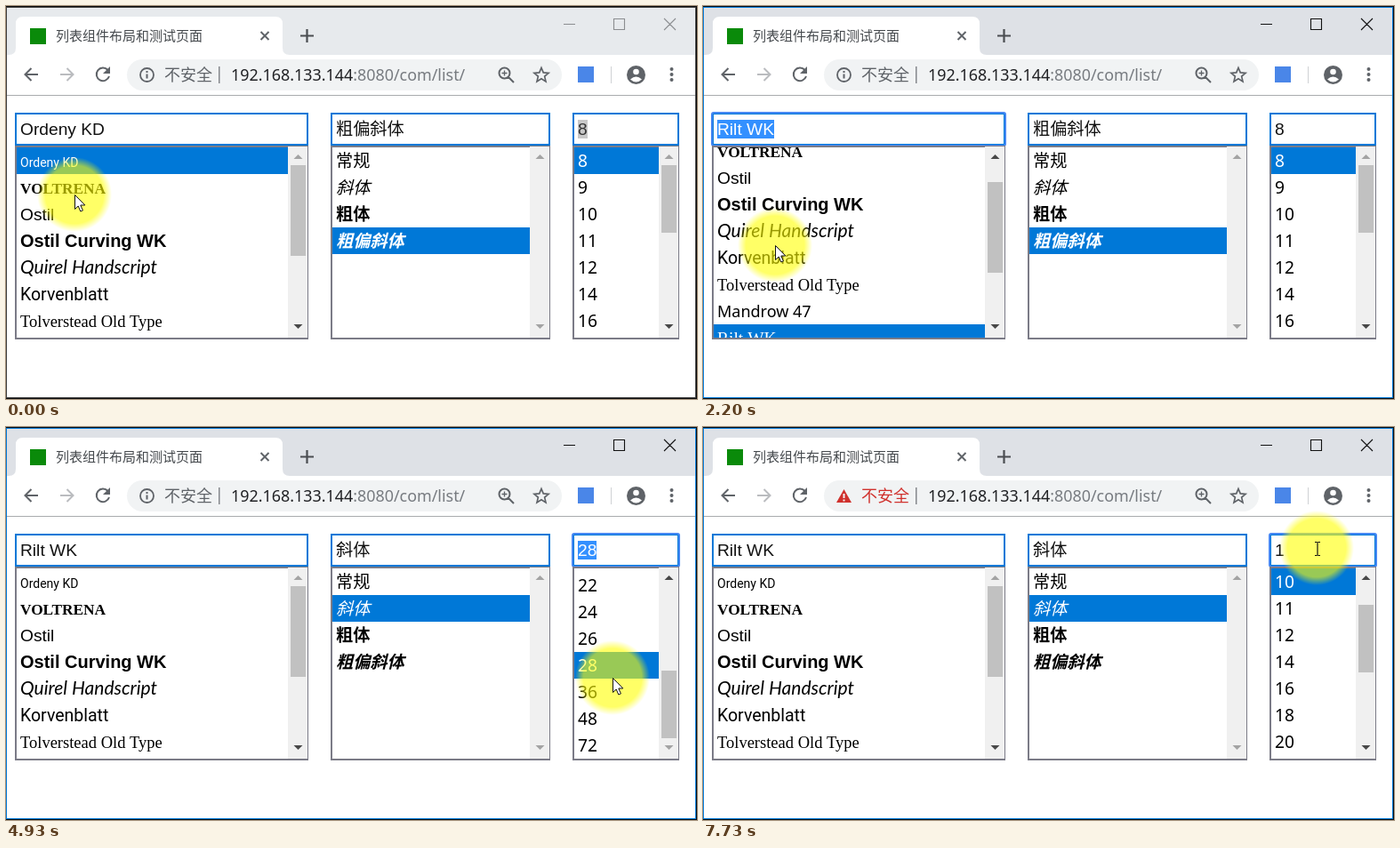
These frames come from a looping animation (777 by 442 pixels, 8 s). An HTML page with a canvas:

```html
<!DOCTYPE html>
<html lang="zh-CN">
<head>
<meta charset="utf-8">
<style>
html, body { margin: 0; width: 100%; height: 100%; overflow: hidden; background: #fff; }
canvas { display: block; }
</style>
</head>
<body>
<canvas id="stage" width="777" height="442"></canvas>
<script>
const ctx = document.getElementById('stage').getContext('2d', { alpha: false });
const LOOP = 8000;
const BLUE = '#0078d7', ICON = '#5f6368';
const UI = '"Noto Sans", "Noto Sans CJK SC", sans-serif';
const SANS = '"Liberation Sans", "Noto Sans CJK SC", sans-serif';
const SERIF = '"Liberation Serif", serif';
const FIELD = '19.2px ' + SANS;

// Moments of the clicks and key presses
const PICK_FONT = 1530, PICK_STYLE = 3330, PICK_SIZE = 4700, CLICK_FIELD = 5700;
const ERASE_ONE = 6470, ERASE_ALL = 6670, TYPE_ONE = 6740;

const fonts = [
  ['Ordeny KD', '14px Roboto, sans-serif'],
  ['VOLTRENA', 'bold 17.3px ' + SERIF],
  ['Ostil', FIELD],
  ['Ostil Curving WK', 'bold 20px ' + SANS],
  ['Quirel Handscript', 'italic 21px Lato, sans-serif'],
  ['Korvenblatt', '19.5px Roboto, sans-serif'],
  ['Tolverstead Old Type', '18.5px ' + SERIF],
  ['Mandrow 47', '18px ' + UI],
  ['Rilt WK', '19.5px ' + SERIF],
  ['Torvin Sans KD', 'bold 16.7px Lato, sans-serif'],
  ['Lestrin WK', 'bold 16.5px ' + SERIF],
  ['DuskVipers QRC', 'italic 17.8px ' + SERIF]
];
const styles = [['常规', ''], ['斜体', 'italic '], ['粗体', 'bold '], ['粗偏斜体', 'italic bold ']]
  .map(([name, style]) => [name, style + '19.2px "Noto Sans CJK SC", sans-serif']);
const sizes = [8, 9, 10, 11, 12, 14, 16, 18, 20, 22, 24, 26, 28, 36, 48, 72]
  .map(n => [String(n), '19.2px ' + UI]);

const pointerPath = [
  [0, 77, 212], [1000, 77, 212], [1400, 78, 271], [1800, 81, 269], [2600, 81, 269],
  [2930, 460, 264], [3330, 428, 206], [3600, 428, 206], [3930, 670, 231], [4400, 679, 261],
  [4530, 679, 261], [4930, 682, 282], [4990, 682, 284], [5600, 690, 136], [LOOP, 690, 136]
];

const progress = (t, a, b) => Math.min(1, Math.max(0, (t - a) / (b - a)));
const smooth = (t, a, b) => { const p = progress(t, a, b); return p * p * (3 - 2 * p); };

function pointerAt(t) {
  const i = pointerPath.findIndex(k => k[0] > t);
  const [a, x0, y0] = pointerPath[i - 1], [b, x1, y1] = pointerPath[i];
  const p = smooth(t, a, b);
  return [x0 + (x1 - x0) * p, y0 + (y1 - y0) * p];
}

function box(x, y, w, h, color) {
  ctx.fillStyle = color;
  ctx.fillRect(x, y, w, h);
}
function text(str, x, y, font, color) {
  ctx.font = font;
  ctx.fillStyle = color;
  ctx.fillText(str, x, y);
  return ctx.measureText(str).width;
}
function fill(d, color) {
  ctx.fillStyle = color;
  ctx.fill(new Path2D(d));
}
function stroke(d, color, width = 2) {
  ctx.strokeStyle = color;
  ctx.lineWidth = width;
  ctx.stroke(new Path2D(d));
}
const circle = (x, y, r) => `M${x - r} ${y}a${r} ${r} 0 1 1 ${2 * r} 0a${r} ${r} 0 1 1 ${-2 * r} 0z`;

function star(x, y, r) {
  let d = '';
  for (let i = 0; i < 10; i++) {
    const a = (i * 36 - 90) * Math.PI / 180, q = i % 2 ? r * 0.45 : r;
    d += (i ? 'L' : 'M') + (x + q * Math.cos(a)) + ' ' + (y + q * Math.sin(a));
  }
  return d + 'z';
}

function drawBrowser(active, warned) {
  box(0, 0, 777, 442, '#fff');
  box(0, 0, 777, 55, active ? '#dee1e6' : '#e7eaed');
  fill('M3 55Q11 55 11 47V20Q11 12 19 12H303Q311 12 311 20V47Q311 55 319 55z', '#fff');
  box(27, 25, 18, 18, '#0a8a0a');
  text('列表组件布局和测试页面', 56, 39, '15px ' + UI, '#45494d');
  stroke('M286.5 29l9 9m0-9l-9 9', ICON);
  stroke('M331 33.5h15m-7.5-7.5v15', '#4a4d51', 2.2);

  const buttons = active ? '#111' : '#8b8d90';
  stroke('M627 20.5h13M683.5 14.5h12v12h-12zM740 14l13 13m0-13l-13 13', buttons, 1.1);

  stroke('M36 77H21.5m7-7l-7 7l7 7', ICON);
  stroke('M61 77h14.5m-7-7l7 7l-7 7', '#babcbf');
  stroke('M114.5 72A7.3 7.3 0 1 0 116 79', ICON);
  fill('M117 68v8h-8z', ICON);

  ctx.beginPath();
  ctx.roundRect(136, 60, 489, 35, 17.5);
  ctx.fillStyle = '#f1f3f4';
  ctx.fill();
  if (warned) {
    fill('M158.5 70l8.5 15h-17z', '#d0312d');
    box(157.5, 75, 2, 5, '#f1f3f4');
    box(157.5, 81.5, 2, 2, '#f1f3f4');
  } else {
    stroke(circle(158.5, 77.5, 7.5), ICON, 1.8);
    box(157.5, 76.5, 2, 5, ICON);
    box(157.5, 73, 2, 2, ICON);
  }
  text('不安全', 178, 84, '18px ' + UI, warned ? '#d0312d' : ICON);
  box(239, 68, 1.5, 19, '#85888c');
  const host = text('192.168.133.144', 253, 84, '17.9px ' + UI, '#202124');
  text(':8080/com/list/', 253 + host, 84, '17.9px ' + UI, '#777b80');

  stroke(circle(560.5, 75.5, 6) + 'M565 80l6 6', ICON);
  stroke('M557.5 75.5h6m-3-3v6', ICON, 1.3);
  stroke(star(602, 78, 8.5), ICON, 1.7);
  box(643, 68, 18, 18, '#4a86e8');
  box(680, 68, 1, 19, '#d0d2d5');
  fill(circle(708.5, 77.5, 10.5), ICON);
  fill(circle(708.5, 74, 3.3) + 'M702 82.5q6.5-6 13 0q-6.5 6-13 0z', '#fff');
  for (const y of [71, 77, 83]) fill(circle(748.5, y, 2), ICON);
  box(0, 100, 777, 1, '#a9abae');

  ctx.lineWidth = 1;
  ctx.strokeStyle = '#111';
  ctx.strokeRect(-0.5, 0.5, 777, 441);
  ctx.strokeStyle = active ? BLUE : '#3c3c3c';
  ctx.strokeRect(0.5, 1.5, 775, 439);
}

// state: '' idle, 'focus', 'select', 'dim' (selected in an inactive window), 'caret'
function drawField(x, w, value, state) {
  ctx.strokeStyle = BLUE;
  ctx.lineWidth = 2;
  ctx.strokeRect(x + 1, 121, w - 2, 35);
  if (state && state !== 'dim') {
    ctx.strokeStyle = '#4587f3';
    ctx.beginPath();
    ctx.roundRect(x, 120, w, 37, 2);
    ctx.stroke();
  }
  ctx.font = FIELD;
  const width = Math.round(ctx.measureText(value).width), left = x + 6;
  if (state === 'select') box(left, 128, width, 21, '#3390ff');
  if (state === 'dim') box(left, 128, width, 21, '#c8c8c8');
  text(value, left, 145, FIELD, state === 'select' ? '#fff' : state === 'dim' ? '#323232' : '#111');
  if (state === 'caret') box(left + width - 2, 128, 1, 21, '#000');
}

function drawList(x, w, rows, selected, scroll) {
  const bar = x + w - 23, content = rows.length * 30, limit = Math.max(0, content - 214);
  const top = Math.round(scroll);
  ctx.strokeStyle = '#7b7b87';
  ctx.lineWidth = 2;
  ctx.strokeRect(x + 1, 158, w - 2, 216);
  ctx.save();
  ctx.beginPath();
  ctx.rect(x + 2, 159, w - 4, 214);
  ctx.clip();
  rows.forEach(([label, font], i) => {
    const y = 159 + i * 30 - top;
    if (y < 129 || y > 373) return;
    if (i === selected) box(x + 2, y, bar - x - 2, 30, BLUE);
    text(label, x + 6, y + 22, font, i === selected ? '#fff' : '#000');
  });
  ctx.restore();

  // The scrollbar overlaps the inner edge of the border
  box(bar, 158, 22, 215, '#f0f0f0');
  if (limit) box(bar + 3, Math.round(179 + top * 171 / content), 17, Math.round(171 * 214 / content), '#c1c1c1');
  const arrow = on => on ? '#484848' : '#a3a3a3';
  fill(`M${bar + 6.5} 172l5-5l5 5z`, arrow(top > 0));
  fill(`M${bar + 6.5} 358l5 5l5-5z`, arrow(top < limit));
}

function drawPointer(x, y, beam) {
  const glow = ctx.createRadialGradient(x, y, 0, x, y, 42);
  glow.addColorStop(0, 'rgba(255,255,0,.6)');
  glow.addColorStop(0.78, 'rgba(255,255,0,.6)');
  glow.addColorStop(1, 'rgba(255,255,0,0)');
  box(x - 42, y - 42, 84, 84, glow);
  ctx.save();
  ctx.translate(Math.round(x), Math.round(y));
  if (beam) {
    stroke('M-2 -6.5h2.5m1 0h2.5M1 -6.5v15M-2 8.5h2.5m1 0h2.5', '#111', 1.2);
  } else {
    const shape = 'M.5 .5v16l3.7-3.5l2.6 6l2.6-1.1l-2.6-5.9h5z';
    fill(shape, '#fff');
    stroke(shape, '#111', 1);
  }
  ctx.restore();
}

function sizeScroll(t) {
  if (t < ERASE_ONE) return 266 * smooth(t, 3980, 4400);
  return 266 - 206 * (1 - (1 - progress(t, TYPE_ONE - 40, 7530)) ** 4);
}

function draw(t) {
  const active = t >= PICK_FONT;
  const [x, y] = pointerAt(t);
  drawBrowser(active, t >= ERASE_ONE);

  const fontState = active && t < PICK_STYLE ? 'select' : '';
  const styleState = t >= PICK_STYLE && t < PICK_SIZE ? 'select' : '';
  const caretOn = t < 6270 || (t >= ERASE_ONE && t < 7730);
  const sizeState = !active ? 'dim' : t < PICK_SIZE ? '' : t < CLICK_FIELD ? 'select' : caretOn ? 'caret' : 'focus';
  const sizeText = t < PICK_SIZE ? '8' : t < ERASE_ONE ? '28' : t < ERASE_ALL ? '2' : t < TYPE_ONE ? '' : '1';
  const sizeRow = t < PICK_SIZE ? 0 : t < ERASE_ONE ? 12 : t < TYPE_ONE ? 8 : 2;
  const fontRow = active ? 8 : 0, styleRow = t < PICK_STYLE ? 3 : 1;

  drawField(10, 330, fonts[fontRow][0], fontState);
  drawField(365, 247, styles[styleRow][0], styleState);
  drawField(637, 120, sizeText, sizeState === 'dim' ? 'dim' : sizeState);
  drawList(10, 330, fonts, fontRow, 146 * (smooth(t, 100, 800) - smooth(t, 1830, 2400)));
  drawList(365, 247, styles, styleRow, 0);
  drawList(637, 120, sizes, sizeRow, sizeScroll(t));
  drawPointer(x, y, y > 120 && y < 157);
}

const start = performance.now();
function frame() {
  draw((performance.now() - start) % LOOP);
  requestAnimationFrame(frame);
}
frame();
</script>
</body>
</html>
```
